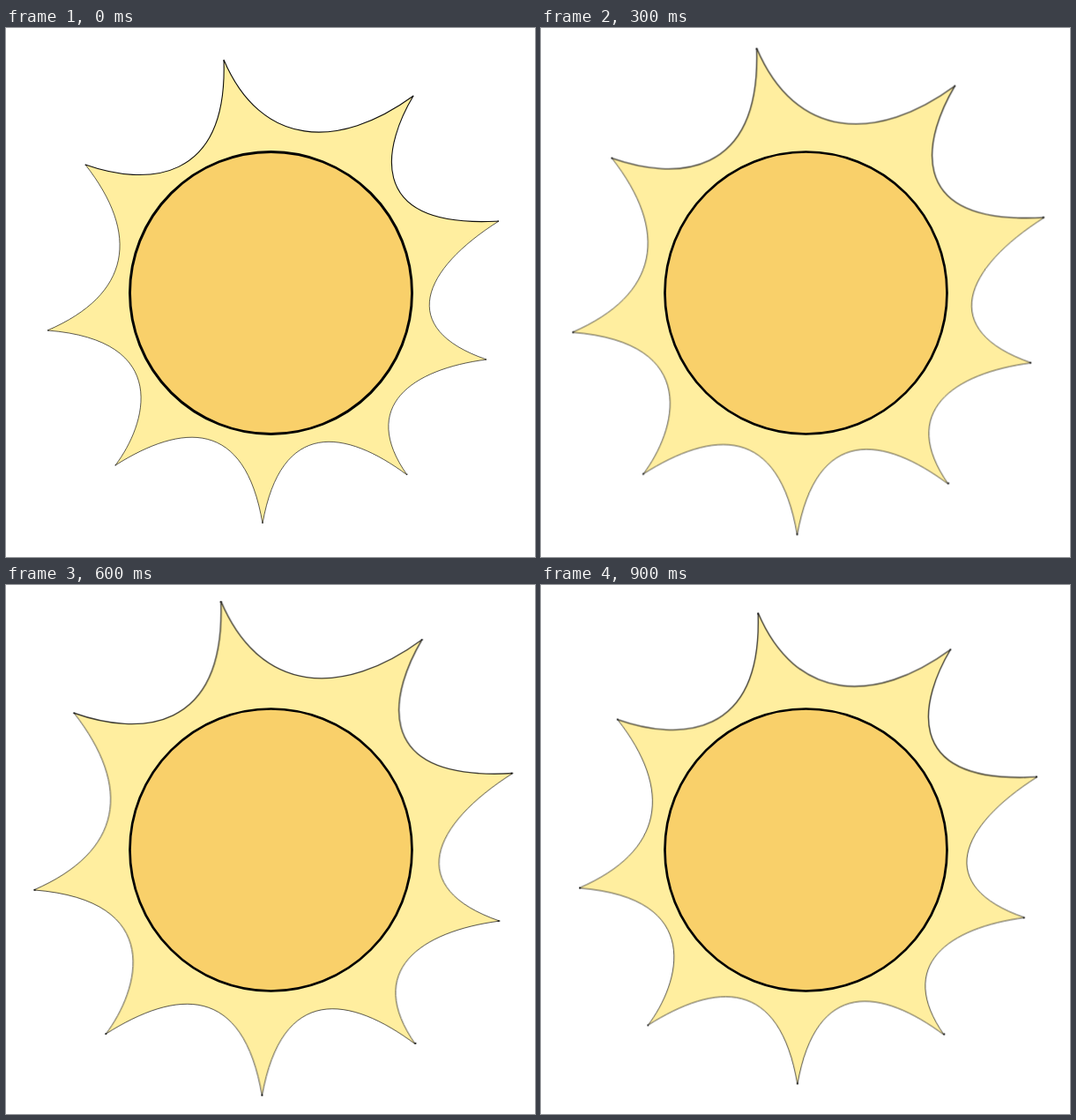
Write an HTML page that moves like this. It is 600 px wide and 600 px high and loops after 1000 ms.

```html
<!DOCTYPE html>
<html lang="en">
<head>
<meta charset="utf-8">
<title>Pulsing sun</title>
<style>
  html, body { margin: 0; width: 100%; height: 100%; overflow: hidden; background: #fff; }
  svg { display: block; width: 100%; height: 100%; }
  path { vector-effect: non-scaling-stroke; fill: none; stroke: #000; }
  .rays {
    transform-origin: 300px 300px;
    animation: pulse 1s steps(5, end) infinite;
  }
  .rays .body { fill: #ffee9f; stroke: none; }
  .bold { animation: bold 1s step-end infinite; }
  .fine { animation: fine 1s step-end infinite; }
  .tips { stroke-linecap: round; animation: tips 1s step-end infinite; }
  .disc { fill: #f9d06a; stroke: #000; animation: disc 1s step-end infinite; }

  /* grows in five hard steps, then shrinks in five */
  @keyframes pulse {
    0%, 100% { transform: scale(1, 1); }
    50% { transform: scale(1.076, 1.084); }
  }
  /* lines are crisper while at rest */
  @keyframes bold {
    0%, 100% { stroke-opacity: .95; stroke-width: 1.1; }
    10% { stroke-opacity: .75; stroke-width: 1.4; }
  }
  @keyframes fine {
    0%, 100% { stroke-opacity: .85; stroke-width: .75; }
    10% { stroke-opacity: .7; stroke-width: .95; }
  }
  @keyframes tips {
    0%, 100% { stroke-opacity: .8; stroke-width: 1.2; }
    10% { stroke-opacity: .8; stroke-width: 2.2; }
  }
  @keyframes disc {
    0%, 100% { stroke-width: 2.9; }
    10% { stroke-width: 2.7; }
  }
</style>
</head>
<body>
<svg viewBox="0 0 600 600">
  <g class="rays">
    <path class="body" d="M90 155C158 179 252 177 247 36C289 135 377 139 462 77C432 127 400 228 559 219
      C472 274 443 341 545 376C460 387 400 429 455 507C385 455 312 443 291 562
      C271 443 200 448 124 496C159 450 189 354 47 343C142 302 152 234 90 155Z"/>
    <path class="bold" d="M90 155C158 179 252 177 247 36C289 135 377 139 462 77C432 127 400 228 559 219"/>
    <path class="fine" d="M559 219C472 274 443 341 545 376C460 387 400 429 455 507C385 455 312 443 291 562
      C271 443 200 448 124 496C159 450 189 354 47 343C142 302 152 234 90 155"/>
    <path class="tips" d="M90 155h0M247 37h0M462 77h0M558 219h0M544 376h0M455 506h0M291 561h0M124 496h0M48 343h0"/>
  </g>
  <circle class="disc" cx="300.5" cy="300.5" r="160"/>
</svg>
</body>
</html>
```
